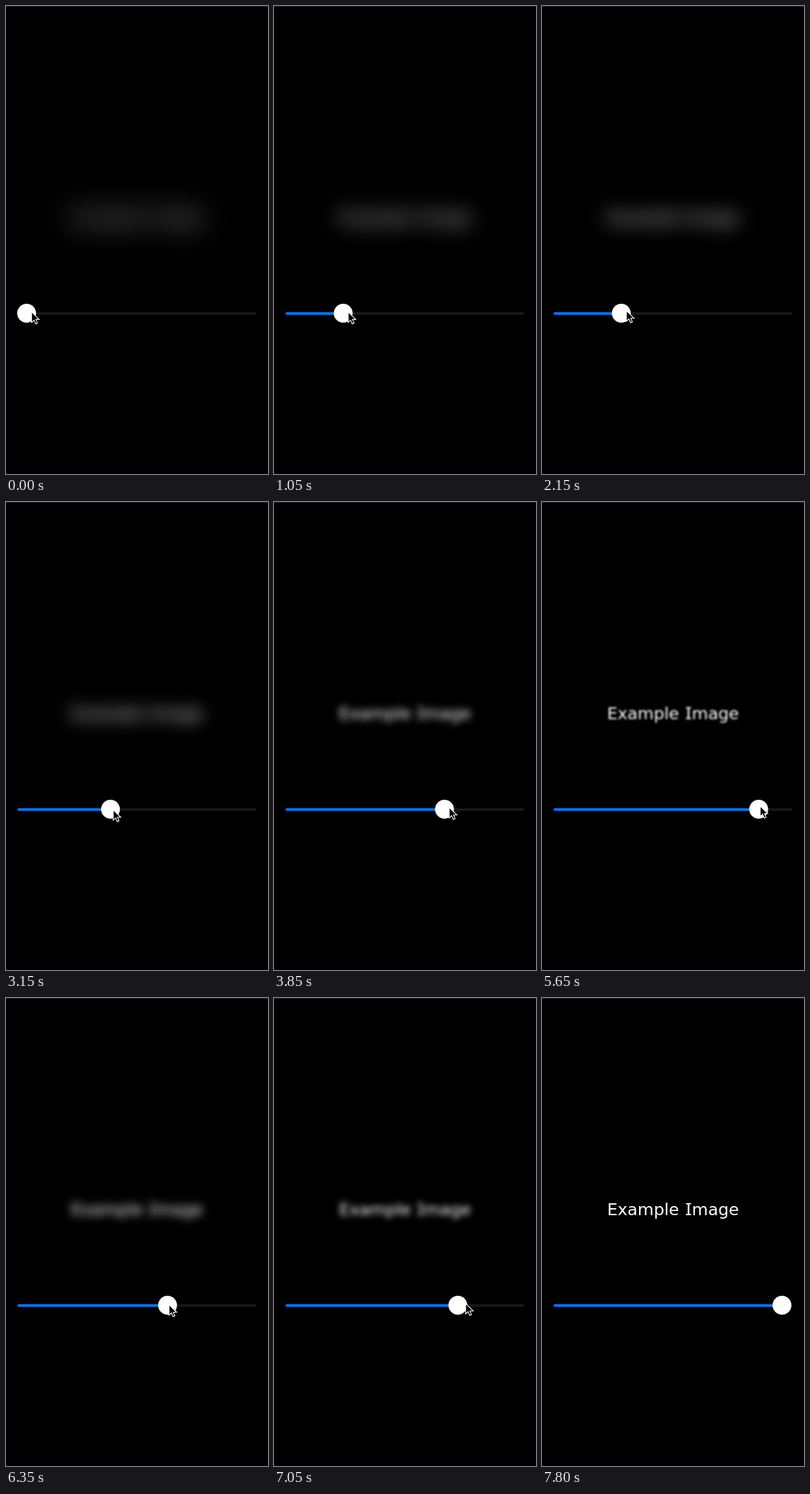
An HTML page that plays this animation: 375 by 668 pixels, repeating every 8850 ms.

```html
<!DOCTYPE html>
<html lang="en">
<head>
<meta charset="utf-8">
<title>Blur slider</title>
<style>
  html, body { margin: 0; height: 100%; overflow: hidden; background: #000; }
  svg { display: block; width: 375px; height: 668px; }
  text { font: 23.75px "DejaVu Sans", Verdana, sans-serif; }
  .track { stroke-width: 4; stroke-linecap: round; }
</style>
</head>
<body>
<svg viewBox="0 0 375 668">
  <rect width="375" height="1" fill="#202020"/>
  <g id="label" fill="#fff">
    <text x="93.2" y="310">Example</text>
    <text x="209.7" y="310" text-anchor="middle">I</text>
    <path d="M206 292.7h7.4v1.8h-7.4zM206 308.2h7.4v1.8h-7.4z"/>
    <text x="214.6" y="310">mage</text>
  </g>
  <path class="track" d="M18.5 439H356" stroke="#181818"/>
  <path class="track" id="fill" stroke="#006fff"/>
  <circle id="knob" cy="438.5" r="13.5" fill="#fff"/>
  <path id="cursor" d="M.6 1V16L4.1 12.7 6.4 18 9 16.9 6.8 11.7H11.5Z"
        fill="#000" stroke="#fff" stroke-width="1.1"/>
</svg>
<script>
const LOOP = 8850, STEP = 50, MAX_BLUR = 20;
const KNOB_MIN = 29.5, KNOB_MAX = 343.5;
const CURSOR_HIDES = 7800;

const smooth = u => u * u * (3 - 2 * u);
const easeIn = power => u => u ** power;
const easeOut = power => u => 1 - (1 - u) ** power;

// Each move: start time, end time, value reached, easing (smooth by default)
const knobMoves = [
  [0, 1300, 106.5],
  [1750, 1850, 113.5],
  [2900, 4750, 339, easeOut(1.2)],
  [5050, 5100, 343],
  [5500, 6450, 230, easeOut(2)],
  [6500, 7750, KNOB_MAX, easeIn(1.5)],
];
// Horizontal distance from the knob's centre to the cursor's tip
const gripMoves = [
  [2100, 2300, 8.5],
  [2400, 2750, 2.5],
  [2900, 3800, 6.2],
  [4700, 5100, 1.5],
  [6500, 7050, 10.5],
  [7400, 7750, 1.5],
];
const heightMoves = [
  [1750, 1850, 434],
  [2400, 2750, 439],
  [2900, 3850, 435],
  [3850, 4750, 433],
  [5650, 6450, 437],
  [6500, 7050, 435],
];

function follow(moves, from, t) {
  return moves.reduce((value, [start, end, to, ease = smooth]) => {
    const u = Math.min(1, Math.max(0, (t - start) / (end - start)));
    return value + (to - value) * ease(u);
  }, from);
}

const [label, fill, knob, cursor] =
  ["label", "fill", "knob", "cursor"].map(id => document.getElementById(id));

function draw(now) {
  const t = Math.floor((now % LOOP) / STEP) * STEP;
  const x = follow(knobMoves, KNOB_MIN, t);
  const cursorX = x + follow(gripMoves, 6.5, t);
  const cursorY = follow(heightMoves, 435.7, t);
  const rest = (KNOB_MAX - x) / (KNOB_MAX - KNOB_MIN);
  const blur = MAX_BLUR * rest ** 1.15;
  label.style.filter = blur > 0.1 ? `blur(${blur}px)` : "none";
  fill.setAttribute("d", `M18.5 439H${x}`);
  knob.setAttribute("cx", x);
  cursor.setAttribute("transform", `translate(${cursorX} ${cursorY})`);
  cursor.style.display = t < CURSOR_HIDES ? "" : "none";
}

const start = performance.now();
function tick() {
  draw(performance.now() - start);
  requestAnimationFrame(tick);
}
tick();
</script>
</body>
</html>
```
